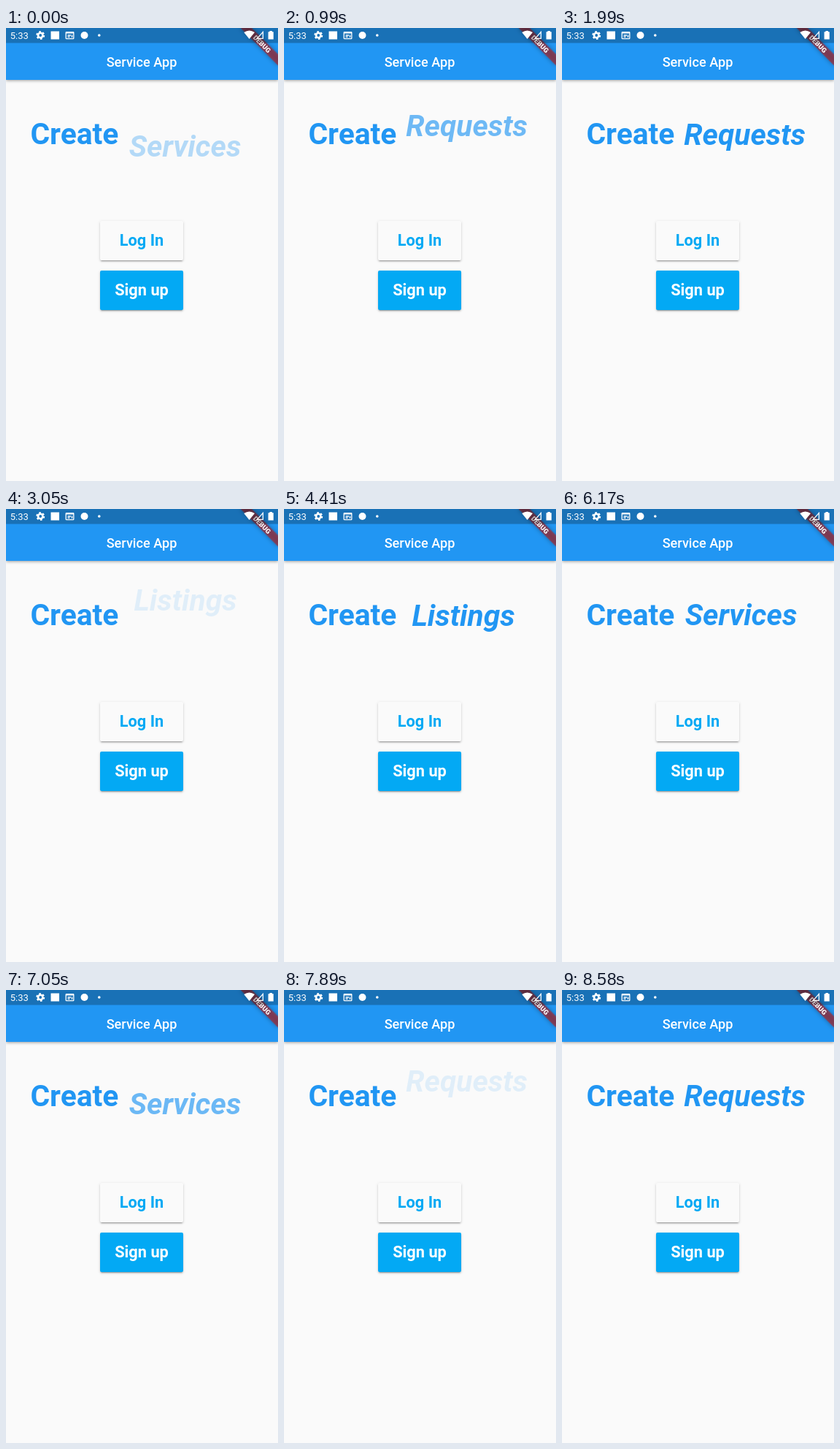
Write an HTML page that moves like this. It is 373 px wide and 620 px high and loops after 8790 ms.

```html
<!DOCTYPE html>
<html lang="en">
<head>
<meta charset="utf-8">
<title>Service App</title>
<style>
  html, body { margin: 0; width: 100%; height: 100%; overflow: hidden; background: #fafafa; }
  div, svg { position: absolute; left: 0; top: 0; }
  .bar { width: 373px; height: 71px; background: #2196f3; box-shadow: 0 1px 4px rgba(0,0,0,.38); }
  .button {
    left: 129px; width: 114px; height: 54.5px; border-radius: 2px;
    box-shadow: 0 2.7px 1px -1.8px rgba(0,0,0,.2), 0 1.8px 2px rgba(0,0,0,.14), 0 1px 4.5px rgba(0,0,0,.12);
  }
  text { font-family: Roboto, sans-serif; font-weight: 700; }
  .head { font-size: 40.8px; fill: #2196f3; }
  .label { font-size: 21.8px; text-anchor: middle; }
  #word { font-style: italic; }
</style>
</head>
<body>
<div class="bar"></div>
<div class="button" style="top:263.5px;background:#fafafa"></div>
<div class="button" style="top:331.8px;background:#03a9f4"></div>
<svg width="373" height="620" viewBox="0 0 373 620" fill="#fff">
  <text x="186" y="53" font-size="18.15" style="font-weight:500" text-anchor="middle">Service App</text>

  <!-- corner ribbon -->
  <g transform="translate(373 0) rotate(45)">
    <rect x="-36.3" y="25.4" width="72.6" height="10.9" fill="#b71c1c" fill-opacity=".63"
      style="filter:drop-shadow(0 0 3px rgba(0,0,0,.5))"/>
    <text y="34.2" font-size="9.25" style="font-weight:900" text-anchor="middle">DEBUG</text>
  </g>

  <!-- status bar -->
  <rect width="373" height="20.5" fill="#000" fill-opacity=".25"/>
  <text x="5.7" y="14.6" font-size="13" style="font-weight:400">5:33</text>
  <g fill="none" stroke="#fff">
    <circle cx="47.2" cy="10" r="3.2" stroke-width="2.6"/>
    <circle cx="47.2" cy="10" r="5" stroke-width="2" stroke-dasharray="2.6 2.636"/>
    <rect x="82.2" y="5.6" width="10.6" height="9" rx=".6" stroke-width="1.3"/>
    <path d="M82 6.8H93M84.5 10H89M84.5 12.3H87.5M90.5 9.5V13" stroke-width="1.4"/>
    <path d="M344.5 14.4L352.4 5.4V14.4Z" stroke-width="1.3"/>
  </g>
  <rect x="61.5" y="4.5" width="11.5" height="11"/>
  <circle cx="107.5" cy="10" r="5"/>
  <circle cx="127.8" cy="10" r="1.8"/>
  <path d="M326.3 6Q333.6 .8 341 6L333.6 15Z"/>
  <path d="M359.6 5.2H361.5V4H365V5.2H366.8V15.6H359.6Z"/>

  <text class="head" x="33.4" y="159">Create</text>
  <text class="head" id="word"></text>
  <text class="label" x="186" y="298" fill="#03a9f4">Log In</text>
  <text class="label" x="186" y="366.3">Sign up</text>
</svg>
<script>
  const LOOP = 8790, TRAVEL = 21, BASE = 159;
  const IN_STEPS = 24, OUT_STEPS = 18;
  const left = { Services: 168.8, Requests: 167.3, Listings: 175.4 };
  // word, entry start and end, exit start and end (ms)
  const phases = [
    ['Services', -1700, -1000, -400, 110],
    ['Requests', 690, 1370, 1990, 2500],
    ['Listings', 3050, 3790, 4410, 4930],
    ['Services', 5480, 6170, 6790, 7310],
    ['Requests', 7890, 8580, 9200, 9710]
  ];
  const word = document.getElementById('word');

  // cubic-bezier(0, 0, .58, 1)
  function easeOut(x) {
    let lo = 0, hi = 1;
    for (let i = 0; i < 20; i++) {
      const u = (lo + hi) / 2;
      if (1.74 * (1 - u) * u * u + u ** 3 < x) lo = u; else hi = u;
    }
    return 3 * (1 - lo) * lo * lo + lo ** 3;
  }

  const step = (t, a, b, n) => Math.min(n, Math.floor((t - a) / (b - a) * n));

  function draw() {
    const t = performance.now() % LOOP;
    const phase = phases.find(p => t >= p[1] && t < p[4]);
    word.setAttribute('visibility', phase ? 'visible' : 'hidden');
    if (phase) {
      const [name, inStart, inEnd, outStart, outEnd] = phase;
      const leaving = t >= outStart;
      const shown = leaving
        ? 1 - (step(t, outStart, outEnd, OUT_STEPS) + 1) / (OUT_STEPS + 1)
        : .07 + .93 * step(t, inStart, inEnd, IN_STEPS) / IN_STEPS;
      if (word.textContent !== name) word.textContent = name;
      word.setAttribute('x', left[name]);
      word.setAttribute('y', BASE + (leaving ? 1 : -1) * TRAVEL * (1 - shown));
      word.setAttribute('opacity', easeOut(shown));
    }
    requestAnimationFrame(draw);
  }
  draw();
</script>
</body>
</html>
```
